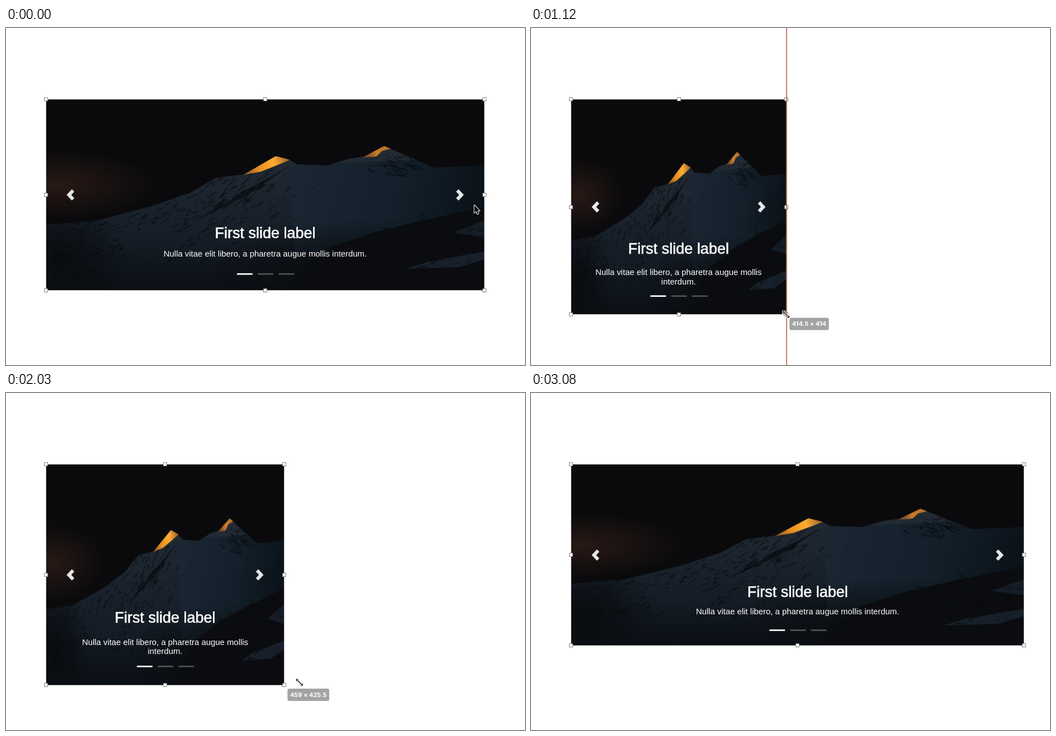
Write an HTML page with a canvas that moves like this. It is 928x603 px and loops after 3150 ms.

```html
<!DOCTYPE html>
<html lang="en">
<head>
<meta charset="utf-8">
<title>Resizing a slide</title>
<style>
  html, body { margin: 0; width: 100%; height: 100%; overflow: hidden; background: #fff; }
  canvas { display: block; width: 928px; height: 603px; }
</style>
</head>
<body>
<canvas id="stage" width="928" height="603"></canvas>
<script>
const ctx = document.getElementById('stage').getContext('2d');
const LOOP = 3150, STEP = 70;
const LEFT = 71.5, TOP = 128, UNIT = 0.9283;   // UNIT: stage pixels per labelled unit
const SANS = '"Liberation Sans", Arial, sans-serif';

// Each drag eases the selection to a new size, in labelled units.
const initial = { w: 844.5, h: 367.5 };
const drags = [
  { from: 565, to: 1120, w: 414.5, h: 414 },
  { from: 1120, to: 1610, w: 293, h: 455 },
  { from: 1890, to: 2240, w: 764, h: 370.5 },
  { from: 2240, to: 2590, w: 860, h: 349 },
  { from: 3010, to: 3080, w: 873, h: 349 }
];

const mix = (a, b, k) => a + (b - a) * k;

function ease(t, from, to) {
  const k = Math.min(1, Math.max(0, (t - from) / (to - from)));
  return k * k * (3 - 2 * k);
}

function sizeAt(t) {
  return drags.reduce((size, drag) => {
    const k = ease(t, drag.from, drag.to);
    return { w: mix(size.w, drag.w, k), h: mix(size.h, drag.h, k) };
  }, initial);
}

function cornerAt(t) {
  const { w, h } = sizeAt(t);
  return { x: LEFT + w * UNIT, y: TOP + h * UNIT };
}

// The slide stalls for a moment while the first drag begins.
const slideTime = t => t >= 630 && t < 910 ? 630 : t;

function paintMountains() {
  const art = document.createElement('canvas');
  art.width = 784;
  art.height = 341;
  const g = art.getContext('2d');
  g.translate(-71, -128);

  let seed = 7;
  const random = () => (seed = (Math.imul(seed, 1664525) + 1013904223) >>> 0) / 4294967296;
  const spread = () => random() + random() - 1;
  const linear = (x0, y0, x1, y1, ...colors) => {
    const fill = g.createLinearGradient(x0, y0, x1, y1);
    colors.forEach((c, i) => fill.addColorStop(i / (colors.length - 1), c));
    return fill;
  };
  const shape = (d, fill) => { g.fillStyle = fill; g.fill(new Path2D(d)); };
  const glow = (x, y, rx, ry, rgb, alpha) => {
    g.save();
    g.translate(x, y);
    g.scale(rx, ry);
    const fill = g.createRadialGradient(0, 0, 0, 0, 0, 1);
    fill.addColorStop(0, `rgba(${rgb},${alpha})`);
    fill.addColorStop(1, `rgba(${rgb},0)`);
    g.fillStyle = fill;
    g.fillRect(-1, -1, 2, 2);
    g.restore();
  };
  // Short ragged strokes running downhill, scattered around a centre
  const rocks = (count, x, y, rx, ry, slope) => {
    g.strokeStyle = 'rgba(9,11,14,.6)';
    for (let i = 0; i < count; i++) {
      const run = 3 + 12 * random(), drop = run * (slope + 0.5 * spread());
      g.lineWidth = 0.6 + 2.2 * random();
      g.beginPath();
      g.moveTo(x + rx * spread(), y + ry * spread());
      g.lineTo(x + rx * spread(), y + ry * spread());
      g.beginPath();
      const sx = x + rx * spread(), sy = y + ry * spread() - slope * rx * 0.1;
      g.moveTo(sx, sy);
      g.lineTo(sx - run * 0.5, sy + drop * 0.3);
      g.lineTo(sx - run, sy + drop);
      g.stroke();
    }
  };

  g.fillStyle = '#0a0a0c';
  g.fillRect(71, 128, 784, 341);
  glow(90, 280, 180, 62, '48,29,24', 0.8);

  g.save();
  g.clip(new Path2D('M71 352L160 345 262 318 330 294 375 268 425 262 482 229 505 235 520 244 575 246 ' +
    '612 234 640 230 676 211 735 237 765 250 855 246V469H71Z'));
  g.fillStyle = linear(0, 225, 0, 469, '#222a33', '#1b242e', '#141c25', '#0b0f14');
  g.fillRect(71, 200, 784, 269);
  shape('M508 246L855 230V400H515Z', linear(510, 240, 855, 330, '#1b2733', '#14212c', '#0b1218'));
  glow(90, 410, 130, 110, '9,11,14', 0.95);
  glow(640, 425, 300, 85, '9,11,14', 1);

  rocks(210, 330, 350, 230, 105, 0.6);
  rocks(70, 430, 295, 90, 40, 0.75);
  rocks(110, 130, 400, 70, 70, 0.4);
  rocks(65, 700, 245, 55, 22, -0.5);
  shape('M508 246L430 300 330 349 440 284Z', 'rgba(9,11,14,.65)');

  shape('M855 320L742 345 650 368 560 400 500 469H855Z', '#0a0c0f');
  shape('M715 431L755 418 855 400V414L810 428Z', '#17202a');
  shape('M800 366L855 344V374Z', '#141d26');
  rocks(120, 770, 385, 100, 50, 0.3);

  shape('M422 263L455 244 482 229 507 236 488 244 455 257Z',
    linear(425, 262, 505, 235, '#8a5520', '#e88f22', '#ffad30', '#a0622a'));
  shape('M636 232L676 211 692 215 672 220 662 230Z',
    linear(636, 232, 690, 212, '#463429', '#d07f2a', '#a8682f'));
  g.restore();
  return art;
}

const mountains = paintMountains();

function wrap(text, width) {
  const lines = [''];
  for (const word of text.split(' ')) {
    const last = lines.length - 1;
    const longer = lines[last] ? lines[last] + ' ' + word : word;
    if (lines[last] && ctx.measureText(longer).width > width) lines.push(word);
    else lines[last] = longer;
  }
  return lines;
}

function chevron(x, y, dir) {
  ctx.strokeStyle = '#e4e6e8';
  ctx.lineWidth = 6;
  ctx.beginPath();
  ctx.moveTo(x - dir * 4.5, y - 8);
  ctx.lineTo(x + dir * 3, y);
  ctx.lineTo(x - dir * 4.5, y + 8);
  ctx.stroke();
}

function drawSlide(w, h) {
  const center = LEFT + w / 2, x = Math.ceil(LEFT);
  ctx.drawImage(mountains, x, TOP, Math.floor(LEFT + w) - x, Math.round(h));
  chevron(LEFT + 44, TOP + h / 2, -1);
  chevron(LEFT + w - 44, TOP + h / 2, 1);

  ctx.fillStyle = ctx.strokeStyle = '#fff';
  ctx.textAlign = 'center';
  ctx.textBaseline = 'alphabetic';
  ctx.font = '27px ' + SANS;
  ctx.lineWidth = 0.6;
  const headingY = TOP + 0.65 * h + 26;
  ctx.fillText('First slide label', center, headingY);
  ctx.strokeText('First slide label', center, headingY);

  ctx.font = '14.9px ' + SANS;
  wrap('Nulla vitae elit libero, a pharetra augue mollis interdum.', w * 0.8)
    .forEach((line, i) => ctx.fillText(line, center, TOP + 0.7766 * h + 16 + i * 16.4));

  for (let i = 0; i < 3; i++) {
    ctx.fillStyle = i ? 'rgba(255,255,255,.28)' : '#fff';
    ctx.fillRect(center - 50.5 + i * 37.2, TOP + 0.9155 * h - 1.5, 28, 2.7);
  }
}

function drawSelection(w, h) {
  const x0 = LEFT, y0 = TOP - 0.5;
  const x1 = Math.floor(LEFT + w) + 0.5, y1 = Math.floor(TOP + h) + 0.5;
  ctx.lineWidth = 1;
  ctx.strokeStyle = 'rgba(165,165,165,.6)';
  ctx.strokeRect(x0, y0, x1 - x0, y1 - y0);
  ctx.fillStyle = '#fff';
  ctx.strokeStyle = '#858585';
  for (const i of [0, 0.5, 1]) for (const j of [0, 0.5, 1]) {
    if (i === 0.5 && j === 0.5) continue;
    const x = Math.floor(mix(x0, x1, i)) - 2.5, y = Math.floor(mix(y0, y1, j)) - 2.5;
    ctx.fillRect(x, y, 6, 6);
    ctx.strokeRect(x, y, 6, 6);
  }
}

function drawGuide(x, y, w, h) {
  ctx.fillStyle = '#b95437';
  ctx.fillRect(x, y, w, h);
}

function drawLabel(x, y, { w, h }) {
  const half = n => Math.round(n * 2) / 2;
  const text = `${half(w)} × ${half(h)}`;
  ctx.font = '700 11px Inter, sans-serif';
  ctx.textAlign = 'left';
  ctx.textBaseline = 'middle';
  ctx.fillStyle = 'rgba(158,158,160,.94)';
  ctx.beginPath();
  ctx.roundRect(x, y, ctx.measureText(text).width + 9, 22, 3);
  ctx.fill();
  ctx.fillStyle = '#fff';
  ctx.fillText(text, x + 4.5, y + 11.5);
}

const arrow = new Path2D('M0 0V13.5L3.2 10.6 5.3 15.6 7.5 14.6 5.4 9.8H9.5Z');
const resizer = new Path2D('M-6 -6H-1.5L-6 -1.5ZM6 6H1.5L6 1.5ZM-5 -4L4 5 5 4 -4 -5Z');

function drawPointer(x, y, path) {
  ctx.save();
  ctx.translate(x, y);
  ctx.lineJoin = 'round';
  ctx.lineWidth = 2;
  ctx.strokeStyle = '#fff';
  ctx.stroke(path);
  ctx.fillStyle = '#0a0a0a';
  ctx.fill(path);
  ctx.restore();
}

function draw(t) {
  ctx.fillStyle = '#fff';
  ctx.fillRect(0, 0, 928, 603);

  const size = sizeAt(t), slide = sizeAt(slideTime(t)), corner = cornerAt(t);
  drawSlide(slide.w * UNIT, slide.h * UNIT);
  drawSelection(size.w * UNIT, size.h * UNIT);

  const snapped = drag => t > drag.to - STEP && t <= drag.to;
  if (snapped(drags[0])) drawGuide(456.3, 0, 1.5, 603);
  if (snapped(drags[2])) drawGuide(0, 471.6, 928, 1.4);

  const dragging = t >= 630 && t < 2800;
  if (dragging) drawLabel(corner.x + 6, corner.y + 6.3, size);

  // The pointer comes to the corner, runs slightly ahead of it, then leaves.
  const lead = cornerAt(t + 15);
  const away = 1 - ease(t, 0, 490), leave = ease(t, 2660, 2940);
  drawPointer(lead.x - 18 * away + 75 * leave, lead.y - 152 * away,
    dragging || t >= 420 && t < 630 ? resizer : arrow);
}

function frame() {
  draw(Math.floor(performance.now() % LOOP / STEP) * STEP);
  requestAnimationFrame(frame);
}
frame();
</script>
</body>
</html>
```
